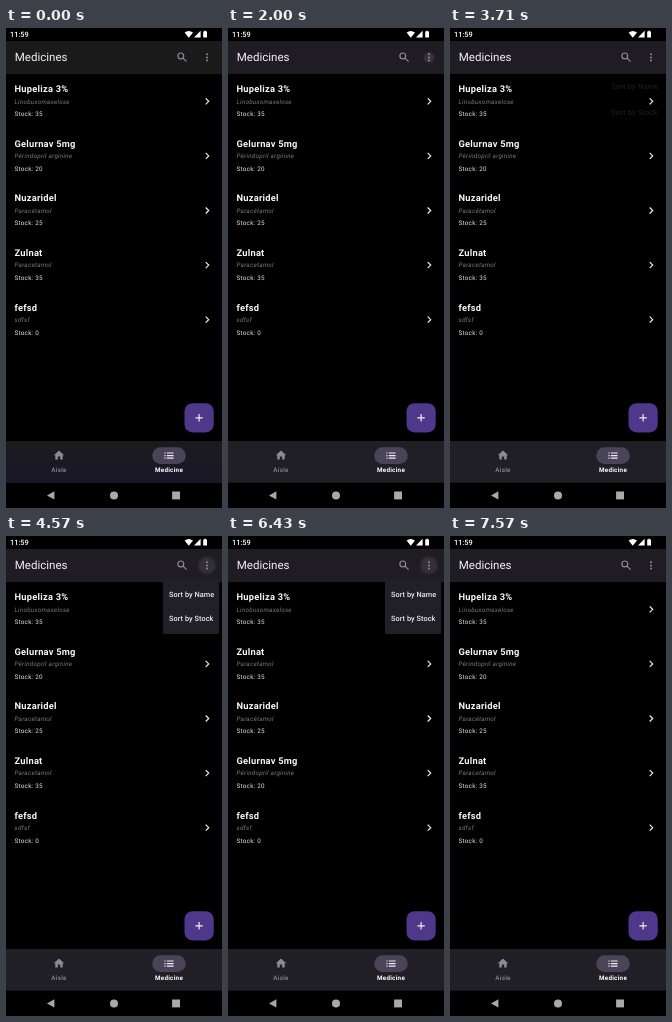
An HTML page for the animation above (8000 ms loop, 216 by 480 pixels).

```html
<!DOCTYPE html>
<html lang="en">
<head>
<meta charset="utf-8">
<title>Medicines</title>
<style>
  html, body { margin: 0; height: 100%; overflow: hidden; background: #000; }
  svg { display: block; width: 100vw; height: 100vh; font-family: Roboto, sans-serif; fill: #fff; }
  text { text-rendering: geometricPrecision; }
  .clock { font-size: 7.4px; font-weight: 500; }
  .title { font-size: 11.55px; fill: #f2f0f4; }
  .name { font-size: 9.3px; font-weight: 700; letter-spacing: .24px; fill: #f6f6f6; }
  .sub { font-size: 6.3px; font-style: italic; letter-spacing: .26px; fill: #7a7a7a; }
  .stock { font-size: 6.3px; letter-spacing: .26px; fill: #e4e4e4; }
  .tab { font-size: 6.3px; font-weight: 500; letter-spacing: .26px; text-anchor: middle; }
  .tab.on { font-weight: 700; }
  .option { font-size: 7.35px; font-weight: 500; letter-spacing: .05px; fill: #eeeaf0; }
  .line { fill: none; stroke: #eee; stroke-width: 1.2; }
  .grey { fill: #8d8a92; }
  .sys { fill: #a9a9a9; }
</style>
</head>
<body>
<svg viewBox="0 0 216 480" preserveAspectRatio="none">
  <defs>
    <linearGradient id="dusk" x2="0" y2="1">
      <stop stop-color="#1b1b1d"/>
      <stop offset="1" stop-color="#1a1629"/>
    </linearGradient>
    <radialGradient id="soft">
      <stop offset=".65" stop-color="#fff"/>
      <stop offset="1" stop-color="#fff" stop-opacity=".15"/>
    </radialGradient>
  </defs>

  <text class="clock" x="4" y="9.3">11:59</text>
  <path d="M178.6 4.6Q182.8 1.4 187 4.6L182.8 9.7Z"/>
  <path d="M194.6 2.8V9.5H188Z"/>
  <path d="M197.2 3.6H198.3V2.8H199.9V3.6H201V9.5H197.2Z"/>

  <rect y="13" width="216" height="33" fill="#1f1d23"/>
  <rect class="dim" y="13" width="216" height="33" fill="#1a1a1a"/>
  <text class="title" x="8.7" y="33.4">Medicines</text>
  <g fill="none" stroke="#8d8a92" stroke-width="1.2">
    <circle cx="174.8" cy="27.9" r="2.9"/>
    <path d="M177 30.1L180.6 33.7"/>
  </g>
  <circle id="ripple" cx="201" cy="29.4" fill="url(#soft)"/>
  <g class="grey">
    <circle cx="201" cy="26.2" r="1"/>
    <circle cx="201" cy="29.4" r="1"/>
    <circle cx="201" cy="32.6" r="1"/>
  </g>

  <g id="list"></g>

  <rect x="178.5" y="375.2" width="29.2" height="29.2" rx="8" fill="#4f378b"/>
  <path class="line" d="M189.4 389.8H196.8M193.1 386.1V393.5"/>

  <rect y="413" width="216" height="41.7" fill="#201f26"/>
  <rect class="dim" y="413" width="216" height="41.7" fill="url(#dusk)"/>
  <path class="grey" d="M53 422.4L58.2 427.2H56.7V431.6H54.2V428.5H51.8V431.6H49.3V427.2H47.8Z"/>
  <text class="tab grey" x="53" y="444.3">Aisle</text>
  <rect x="146.2" y="419.2" width="33.6" height="16.8" rx="8.4" fill="#4a4458"/>
  <path class="line" d="M158.4 425H159.6M158.4 427.6H159.6M158.4 430.2H159.6M160.8 425H167.6M160.8 427.6H167.6M160.8 430.2H167.6"/>
  <text class="tab on" x="163" y="444.3">Medicine</text>

  <path class="sys" d="M41 467.4L48.4 463.2V471.6Z"/>
  <circle class="sys" cx="108" cy="467.4" r="4"/>
  <rect class="sys" x="166.1" y="463.5" width="7.9" height="7.9"/>

  <g id="menu">
    <rect id="panel" x="157" y="43" width="56.2" height="55" rx="2" fill="#211f28"/>
    <rect id="press" x="157" width="56.2" height="24.4"/>
    <text class="option" x="163" y="60.7">Sort by Name</text>
    <text class="option" x="163" y="85">Sort by Stock</text>
  </g>
</svg>
<script>
const $ = id => document.getElementById(id);
const LOOP = 8000, FPS = 7, PITCH = 54.6;

const items = [
  ['Hupeliza 3%', 'Linobuxomaxelose', 35],
  ['Gelurnav 5mg', 'Périndopril arginine', 20],
  ['Nuzaridel', 'Paracétamol', 25],
  ['Zulnat', 'Paracetamol', 35],
  ['fefsd', 'sdfsf', 0]
];
const orders = { name: [0, 1, 2, 3, 4], stock: [0, 3, 2, 1, 4] };

$('list').innerHTML = items.map(([name, sub, stock]) => `<g>
  <text class="name" x="8.5" y="64.2">${name}</text>
  <text class="sub" x="8.5" y="75.7">${sub}</text>
  <text class="stock" x="8.5" y="88.3">Stock: ${stock}</text>
  <path class="line" d="M199.7 70.3L202.7 73.3L199.7 76.3"/>
</g>`).join('');
const rows = [...$('list').children];
const dims = document.querySelectorAll('.dim');

const closed = { alpha: 0, scale: 1, panel: 1, radius: 0, glow: 0, item: 0, press: 0, sort: 'name' };
const open = { ...closed, alpha: 1 };
const byStock = { sort: 'stock' };
const tap = { radius: 6, glow: .1 };
const growing = { alpha: .9, scale: .9, radius: 9, glow: .1 };
const held = { radius: 10, glow: .09 };
const ghost = alpha => ({ ...closed, alpha, scale: 1.045, panel: 0 });

// [step, state], seven steps per second
const steps = [
  [0, closed],
  [14, { ...closed, ...tap }],
  [15, { ...open, ...growing }],
  [16, { ...open, ...held }],
  [17, { ...open, radius: 10, glow: .05 }],
  [18, open],
  [24, { ...open, press: .1 }],
  [25, { ...open, alpha: .5, press: .1 }],
  [26, ghost(.1)],
  [27, ghost(.04)],
  [28, closed],
  [31, { ...open, ...growing }],
  [32, { ...open, ...held }],
  [33, open],
  [35, { ...open, item: 1, press: .1 }],
  [37, { ...open, ...byStock, alpha: .3, item: 1, press: .1 }],
  [38, { ...closed, ...byStock }],
  [43, { ...closed, ...byStock, ...tap }],
  [44, { ...open, ...byStock, ...growing }],
  [45, { ...open, ...byStock, ...held }],
  [46, { ...open, ...byStock }],
  [49, { ...open, ...byStock, press: .06 }],
  [50, { ...open, ...byStock, press: .1 }],
  [51, { ...open, alpha: .4, press: .1 }],
  [52, ghost(.05)],
  [53, closed]
];

function set(el, attrs) {
  for (const key in attrs) el.setAttribute(key, attrs[key]);
}

function draw(ms) {
  const step = Math.floor((ms % LOOP + 5) * FPS / 1000) % (LOOP * FPS / 1000);
  const s = steps.filter(([at]) => at <= step).pop()[1];

  // the bars settle to their tint during the first second
  dims.forEach(dim => set(dim, { opacity: Math.max(0, 1 - step / 8) }));

  orders[s.sort].forEach((item, place) =>
    set(rows[item], { transform: `translate(0 ${place * PITCH})` }));
  set($('ripple'), { r: s.radius, 'fill-opacity': s.glow });
  set($('menu'), {
    opacity: s.alpha,
    transform: `translate(207 43) scale(${s.scale}) translate(-207 -43)`
  });
  set($('panel'), { opacity: s.panel });
  set($('press'), { y: 46 + s.item * 24.4, 'fill-opacity': s.press });
}

const start = performance.now();
function tick() {
  draw(performance.now() - start);
  requestAnimationFrame(tick);
}
tick();
</script>
</body>
</html>
```
